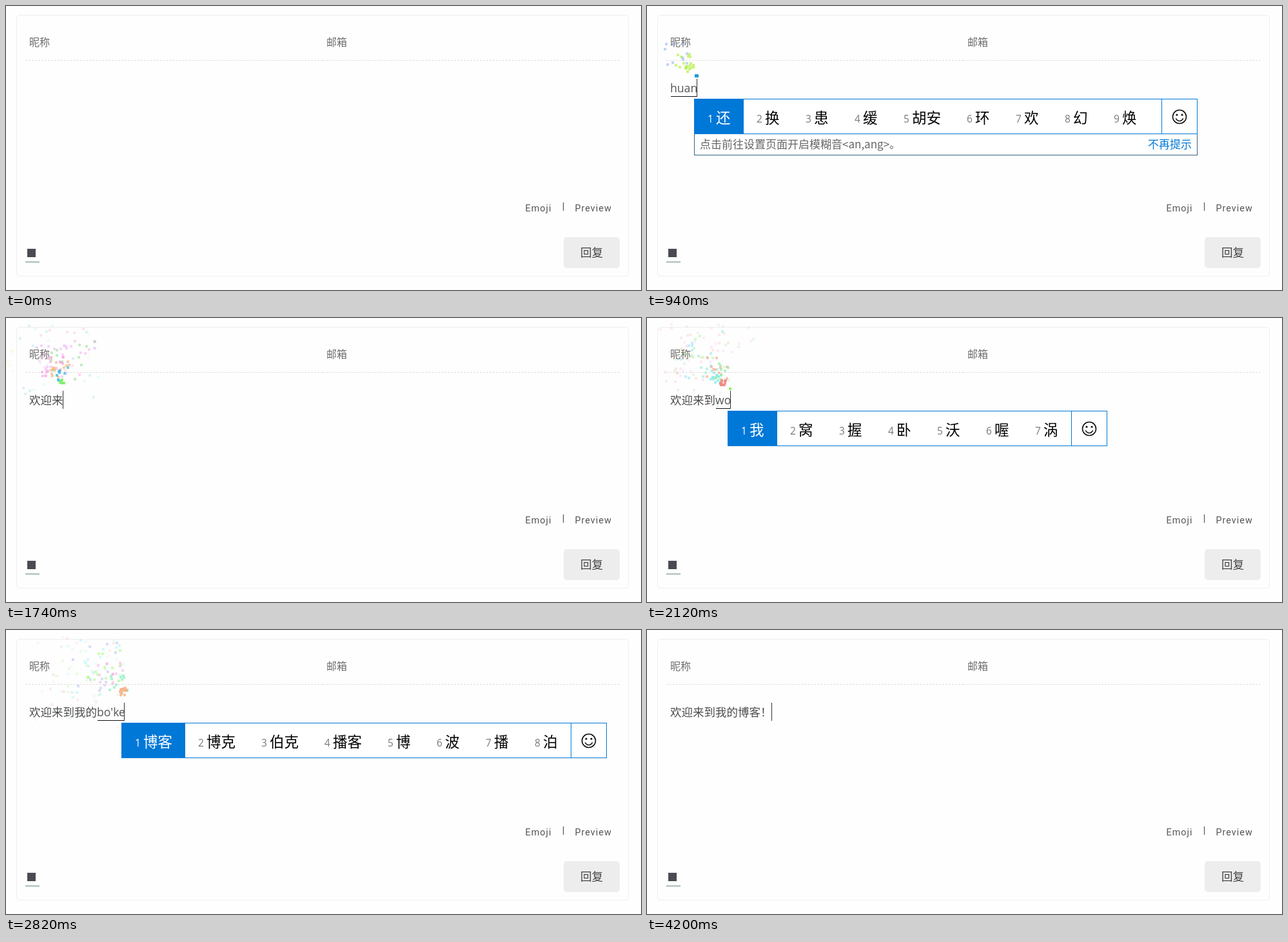
An HTML page with a canvas that plays this animation: 985 px wide and 441 px high, repeating every 4250 ms.

```html
<!DOCTYPE html>
<html lang="zh-CN">
<head>
<meta charset="utf-8">
<style>
html, body { margin: 0; width: 100%; height: 100%; overflow: hidden; background: #fff; }
canvas { display: block; }
</style>
</head>
<body>
<canvas id="stage" width="985" height="441"></canvas>
<script>
const ctx = document.getElementById('stage').getContext('2d');
const LOOP = 4250;
const CJK = '"Noto Sans CJK SC", "Noto Sans CJK JP", "Noto Sans CJK", sans-serif';
const INPUT_FONT = '300 17.5px ' + CJK;
const PINYIN_FONT = '17.6px "Open Sans", "Noto Sans", sans-serif';
const BLUE = '#0078d7';
const LEFT = 36;
const CHAR = 17.5;

// [time, committed text, pinyin, particle colour, candidates]
const keys = [
  [700, '', 'h', '#92b6f6', '和 会 好 还 很 后 化'],
  [780, '', 'hu', '#b8f050', '湖 户 胡 护 虎 互 呼'],
  [860, '', 'hua', '#bcf25c', '话 花 化 画 华 滑 划'],
  [930, '', 'huan', '#189fd0', '还 换 患 缓 胡安 环 欢 幻 焕'],
  [1020, '', "huan'y", '#82f0d6', '欢迎 欢愉 还要 还有 换 还 欢'],
  [1170, '', "huan'yi", '#f596be', '换衣 欢意 还以 换 还 欢 患'],
  [1270, '', "huan'yin", '#3cc83c', '欢饮 换引 欢迎 换 还 欢 患'],
  [1340, '', "huan'ying", '#f08ce6', '欢迎 幻影 环影 换 还 欢 幻'],
  [1410, '欢迎', '', '#eba0f5', ''],
  [1490, '欢迎', 'l', '#f596dc', '了 来 里 啦 两 老 林'],
  [1545, '欢迎', 'la', '#f0b478', '啦 拉 辣 蜡 腊 喇 落'],
  [1600, '欢迎', 'lai', '#3cbee8', '来 赖 莱 睐 籁 徕 濑'],
  [1685, '欢迎来', '', '#82f06e', ''],
  [1840, '欢迎来', 'd', '#82ebd2', '的 到 大 都 多 对 点'],
  [1895, '欢迎来', 'da', '#f5a08c', '大 打 达 答 搭 瘩 嗒'],
  [1950, '欢迎来', 'dao', '#96eba0', '到 道 倒 导 岛 刀 稻'],
  [2010, '欢迎来到', '', '#8cebe6', ''],
  [2065, '欢迎来到', 'w', '#f08c82', '我 为 无 问 外 万 位'],
  [2120, '欢迎来到', 'wo', '#96f064', '我 窝 握 卧 沃 喔 涡'],
  [2175, '欢迎来到', 'wod', '#a0f0e1', '我的 我到 我 窝 握 沃'],
  [2230, '欢迎来到', 'wode', '#50e6f0', '我的 我得 我 窝 握 沃'],
  [2285, '欢迎来到我的', '', '#6e87e1', ''],
  [2400, '欢迎来到我的', 'b', '#78f53c', '博 波 播 拨 薄 伯 泊'],
  [2520, '欢迎来到我的', 'bo', '#f0aadc', '博 波 播 拨 薄 伯 泊'],
  [2630, '欢迎来到我的', "bo'k", '#82f0b4', '博客 博克 伯克 播客 博 波 播 泊'],
  [2740, '欢迎来到我的', "bo'ke", '#fab48c', '博客 博克 伯克 播客 博 波 播 泊'],
  [2890, '欢迎来到我的博客', '', '#a082f5', ''],
  [3130, '欢迎来到我的博客！', '', '#5a50e1', '']
].map(([time, done, pinyin, color, words]) => {
  ctx.font = PINYIN_FONT;
  const base = LEFT + done.length * CHAR;
  // The caret overlaps the last pinyin letter by one pixel.
  const caret = pinyin ? base + ctx.measureText(pinyin).width - 1 : base;
  return { time, done, pinyin, color, base, caret: Math.floor(caret),
    words: words ? words.split(' ') : [] };
});

function random(seed) {
  return () => {
    seed = (seed * 1664525 + 1013904223) >>> 0;
    return seed / 4294967296;
  };
}

keys.forEach((key, i) => {
  const rnd = random(i * 7919 + 31);
  key.sparks = Array.from({ length: 9 + Math.floor(rnd() * 6) },
    () => ({ vx: (rnd() * 2 - 1) * 1.25, vy: (-3.5 + rnd() * 2) * 1.25 }));
});

function text(str, x, y, font, color, align = 'left') {
  ctx.font = font;
  ctx.fillStyle = color;
  ctx.textAlign = align;
  ctx.fillText(str, x, y);
}

function rect(x, y, w, h, color) {
  ctx.fillStyle = color;
  ctx.fillRect(x, y, w, h);
}

function frame(x, y, w, h, color) {
  ctx.strokeStyle = color;
  ctx.lineWidth = 1;
  ctx.strokeRect(x + .5, y + .5, w - 1, h - 1);
}

// Dashes are spaced so that the line starts and ends with a full one.
function dashedLine(x, y, width) {
  const count = Math.round((width + 2) / 5);
  ctx.strokeStyle = '#ddd';
  ctx.lineWidth = 1;
  ctx.setLineDash([3, (width - 3 * count) / (count - 1)]);
  ctx.beginPath();
  ctx.moveTo(x, y);
  ctx.lineTo(x + width, y);
  ctx.stroke();
  ctx.setLineDash([]);
}

function drawForm() {
  rect(0, 0, 985, 441, '#fefefe');
  ctx.strokeStyle = '#eee';
  ctx.lineWidth = 1;
  ctx.beginPath();
  ctx.roundRect(16.5, 14.5, 949, 405, 4.5);
  ctx.stroke();

  text('昵称', 36, 61.5, '300 16px ' + CJK, '#6c6c6c');
  text('邮箱', 497, 61.5, '300 16px ' + CJK, '#6c6c6c');
  dashedLine(30, 84.5, 461);
  dashedLine(491, 84.5, 461);

  ctx.letterSpacing = '1px';
  text('Emoji', 805.5, 319, '14.4px Roboto, sans-serif', '#555');
  text('Preview', 882.5, 319, '14.4px Roboto, sans-serif', '#555');
  ctx.letterSpacing = '0px';
  rect(864, 305, 1, 13, '#444');

  rect(33, 377, 13, 13, '#4a4a52');
  rect(30, 397, 22, 1, '#66857c');

  ctx.fillStyle = '#ededed';
  ctx.beginPath();
  ctx.roundRect(865, 359, 87, 48, 5);
  ctx.fill();
  text('回复', 908.5, 389, '300 17.6px ' + CJK, '#444', 'center');
}

function drawSmiley(x, y) {
  ctx.strokeStyle = '#111';
  ctx.lineWidth = 1.6;
  ctx.beginPath();
  ctx.arc(x, y, 10.5, 0, Math.PI * 2);
  ctx.stroke();
  ctx.beginPath();
  ctx.arc(x, y + .5, 6, .35, Math.PI - .35);
  ctx.stroke();
  ctx.fillStyle = '#111';
  for (const dx of [-4, 4]) {
    ctx.beginPath();
    ctx.arc(x + dx, y - 3, 1.6, 0, Math.PI * 2);
    ctx.fill();
  }
}

function drawCandidates({ words, caret, pinyin }) {
  const left = caret - 4;
  const cellWidth = word => 54 + 22 * word.length;
  const hint = pinyin.startsWith('huan');
  const cells = words.reduce((sum, word) => sum + cellWidth(word), 0);
  const width = Math.max(cells + 57, hint ? 781 : 0);
  const divider = left + width - 56;

  rect(left, 144, width, hint ? 88 : 55, '#fff');
  if (hint) {
    frame(left, 198, width, 34, '#3a6484');
    text('点击前往设置页面开启模糊音<an,ang>。', left + 9, 221, '17px ' + CJK, '#666');
    text('不再提示', left + width - 9, 221, '17px ' + CJK, BLUE, 'right');
  }
  frame(left, 144, width, 55, BLUE);
  rect(left, 144, cellWidth(words[0]) + 1, 55, BLUE);
  rect(divider, 144, 1, 55, BLUE);

  let x = left;
  words.forEach((word, i) => {
    text(i + 1, x + 21, 181, '15.5px "Open Sans", "Noto Sans", sans-serif', i ? '#7a7a7a' : '#fff');
    text(word, x + 34, 181.5, '22.5px ' + CJK, i ? '#000' : '#fff');
    x += cellWidth(word);
  });
  drawSmiley(divider + 28, 172);
}

function drawInput(key, t) {
  const { done = '', pinyin = '', base = LEFT, caret = LEFT } = key || {};
  text(done, LEFT, 134, INPUT_FONT, '#4c4c4c');
  if (pinyin) {
    text(pinyin, base, 134, PINYIN_FONT, '#555');
    rect(Math.round(base) + 1, 140, caret - Math.round(base), 1, '#111');
  }
  const since = t - (key ? key.time : 310);
  const visible = since >= 0 && Math.floor(since / 500) % 2 === 0;
  if (visible || pinyin) rect(caret, 113, 1, 28, '#333');
}

function drawSparks(t) {
  for (const { time, caret, color, sparks } of keys) {
    const age = (t - time) * .06;
    const alpha = Math.pow(.96, age);
    if (age < 0 || alpha <= .1) continue;
    ctx.globalAlpha = alpha;
    for (const { vx, vy } of sparks) {
      const x = caret + vx * age;
      const y = 110.5 + vy * age + .047 * age * age;
      rect(Math.round(x - 2), Math.round(y - 2), 4, 4, color);
    }
  }
  ctx.globalAlpha = 1;
}

function draw(now) {
  const t = now % LOOP;
  const key = keys.filter(k => k.time <= t).pop();
  drawForm();
  drawInput(key, t);
  drawSparks(t);
  if (key && key.words.length) drawCandidates(key);
}

const start = performance.now();
function tick() {
  draw(performance.now() - start);
  requestAnimationFrame(tick);
}
tick();
</script>
</body>
</html>
```
